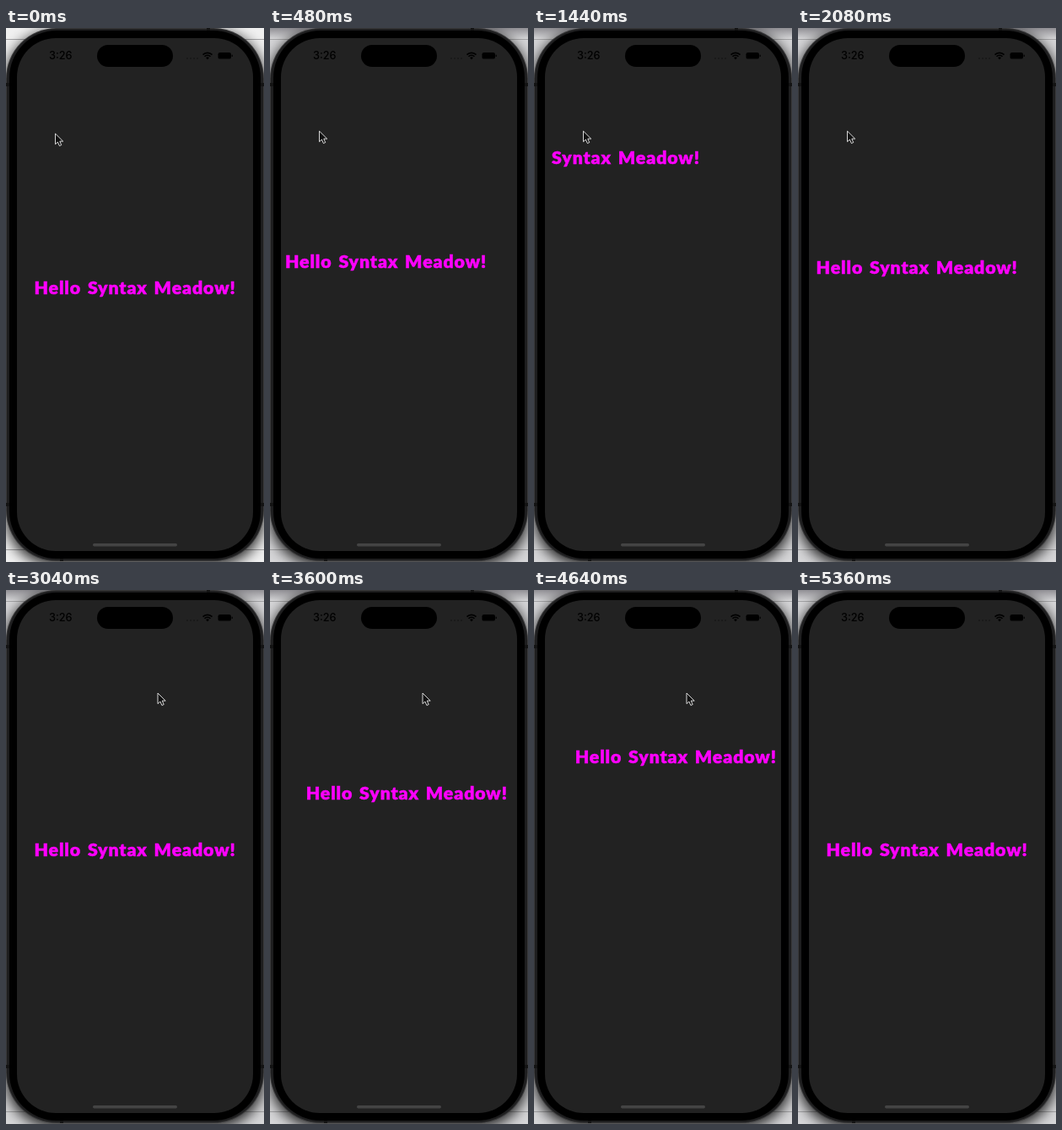
These frames come from a looping animation (306 by 632 pixels, 5.92 s). An HTML page:

```html
<!DOCTYPE html>
<html lang="en">
<head>
<meta charset="utf-8">
<title>Phone greeting</title>
<style>
html, body { margin: 0; width: 100%; height: 100%; overflow: hidden; background: #b8b8ba; }
svg { display: block; width: 100vw; height: 100vh; }
</style>
</head>
<body>
<svg viewBox="0 0 306 632" preserveAspectRatio="none">
  <defs>
    <clipPath id="screen"><rect x="13" y="12" width="280" height="607" rx="46"/></clipPath>
    <filter id="soft" x="-10%" y="-10%" width="120%" height="120%"><feGaussianBlur stdDeviation="8"/></filter>
    <linearGradient id="haze" x2="0" y2="1">
      <stop offset="0" stop-color="#4a4850" stop-opacity=".5"/>
      <stop offset="1" stop-color="#4a4850" stop-opacity="0"/>
    </linearGradient>
  </defs>

  <rect id="desk" width="306" height="632"/>
  <rect id="top" width="306" height="13" fill="url(#haze)"/>
  <path d="M0 13.5H306M0 617.5H306" stroke="#a4a4a6"/>
  <rect x="0" y="4" width="306" height="632" rx="58" fill="#000" opacity=".85" filter="url(#soft)"/>

  <rect x="0" y="0" width="306" height="631" rx="60" fill="#383839"/>
  <rect x="1" y="1" width="304" height="629" rx="59" fill="#1e1e1f"/>
  <path d="M0 67H4M302 67H306M0 564H4M302 564H306M240 0V3M66 628V631" stroke="#141414" stroke-width="4"/>
  <rect x="4" y="3" width="298" height="625" rx="56" fill="#000"/>
  <rect x="13" y="12" width="280" height="607" rx="46" fill="#222"/>

  <g fill="#000">
    <rect x="108" y="20" width="90" height="26" rx="13"/>
    <text x="51" y="37" font-family="Inter, sans-serif" font-weight="500" font-size="12.7">3:26</text>
    <g fill="#191919">
      <circle cx="215" cy="36" r="1"/><circle cx="219" cy="36" r="1"/>
      <circle cx="223" cy="36" r="1"/><circle cx="227" cy="36" r="1"/>
    </g>
    <path d="M239 37.3l-1.9-2a2.7 2.7 0 0 1 3.8 0z"/>
    <path d="M233.5 31.6a7.8 7.8 0 0 1 11 0M235.5 33.8a5 5 0 0 1 7 0" fill="none" stroke="#000" stroke-width="1.6"/>
    <rect x="251.5" y="29" width="15.5" height="7.6" rx="2.2"/>
    <rect x="267.6" y="31.5" width="1.2" height="2.6" rx=".6"/>
  </g>

  <g clip-path="url(#screen)">
    <text id="hello" x="153" y="315" text-anchor="middle" font-family="Lato, sans-serif" font-weight="900"
      font-size="21.3" letter-spacing=".9" word-spacing="2" fill="#f0f" stroke="#f0f" stroke-width=".5">Hello Syntax Meadow!</text>
  </g>
  <rect x="103" y="610" width="100" height="3.4" rx="1.7" fill="#444"/>
  <path id="cursor" d="M0 0V12.6L2.9 10L4.9 14.5L7.2 13.5L5.3 9.1H9.2Z" fill="#111" stroke="#eee" stroke-width=".9" stroke-linejoin="round"/>
</svg>
<script>
const LOOP = 5920, STEP = 80, MIRROR = 5446;
const $ = id => document.getElementById(id);
const hello = $('hello'), cursor = $('cursor'), desk = $('desk'), haze = $('top');

// Height of the text above its resting place: [ms, px]
const lift = [[240, 0], [400, 14], [560, 52], [800, 109], [880, 125], [1040, 158], [1200, 184],
  [1280, 182], [1440, 154], [1520, 137], [1840, 68], [2160, 13], [2400, 0]];

function slope(i) {
  const a = lift[i - 1], b = lift[i + 1];
  return a && b ? (b[1] - a[1]) / (b[0] - a[0]) : 0;
}

function height(t) {
  const i = lift.findIndex(p => p[0] > t);
  if (i < 1) return 0;
  const [t0, y0] = lift[i - 1], [t1, y1] = lift[i], d = t1 - t0;
  const u = (t - t0) / d, v = 1 - u;
  return v * v * (1 + 2 * u) * y0 + u * u * (3 - 2 * u) * y1
    + d * u * v * (v * slope(i - 1) - u * slope(i));
}

function ramp(t, from, to) {
  const u = Math.min(1, Math.max(0, (t - from) / (to - from)));
  return u * u * (3 - 2 * u);
}

function move(el, x, y) {
  el.setAttribute('transform', `translate(${x.toFixed(2)} ${y.toFixed(2)})`);
}

function draw(t) {
  // The second trip retraces the first in reverse, leaning right
  const back = t > MIRROR / 2;
  const h = height(back ? MIRROR - t : t);
  move(hello, h * (back ? 0.138 : -0.492), -h);

  const go = ramp(t, 2640, 3040);
  const x = 58.5 + 121.5 * go + ramp(t, 3040, 3200);
  const y = 125 - 3 * ramp(t, 0, 160) - 28 * Math.sin(Math.PI * go);
  move(cursor, x, y);
  cursor.setAttribute('visibility', t < 5280 ? 'visible' : 'hidden');

  // The window behind the phone dims once it loses focus
  const lit = t < STEP;
  desk.setAttribute('fill', lit ? '#f0f0f0' : '#d6d6d8');
  haze.setAttribute('opacity', lit ? 0 : 1);
}

const start = performance.now();
function tick() {
  const t = (performance.now() - start) % LOOP;
  draw(Math.floor(t / STEP) * STEP);
  requestAnimationFrame(tick);
}
draw(0);
tick();
</script>
</body>
</html>
```
